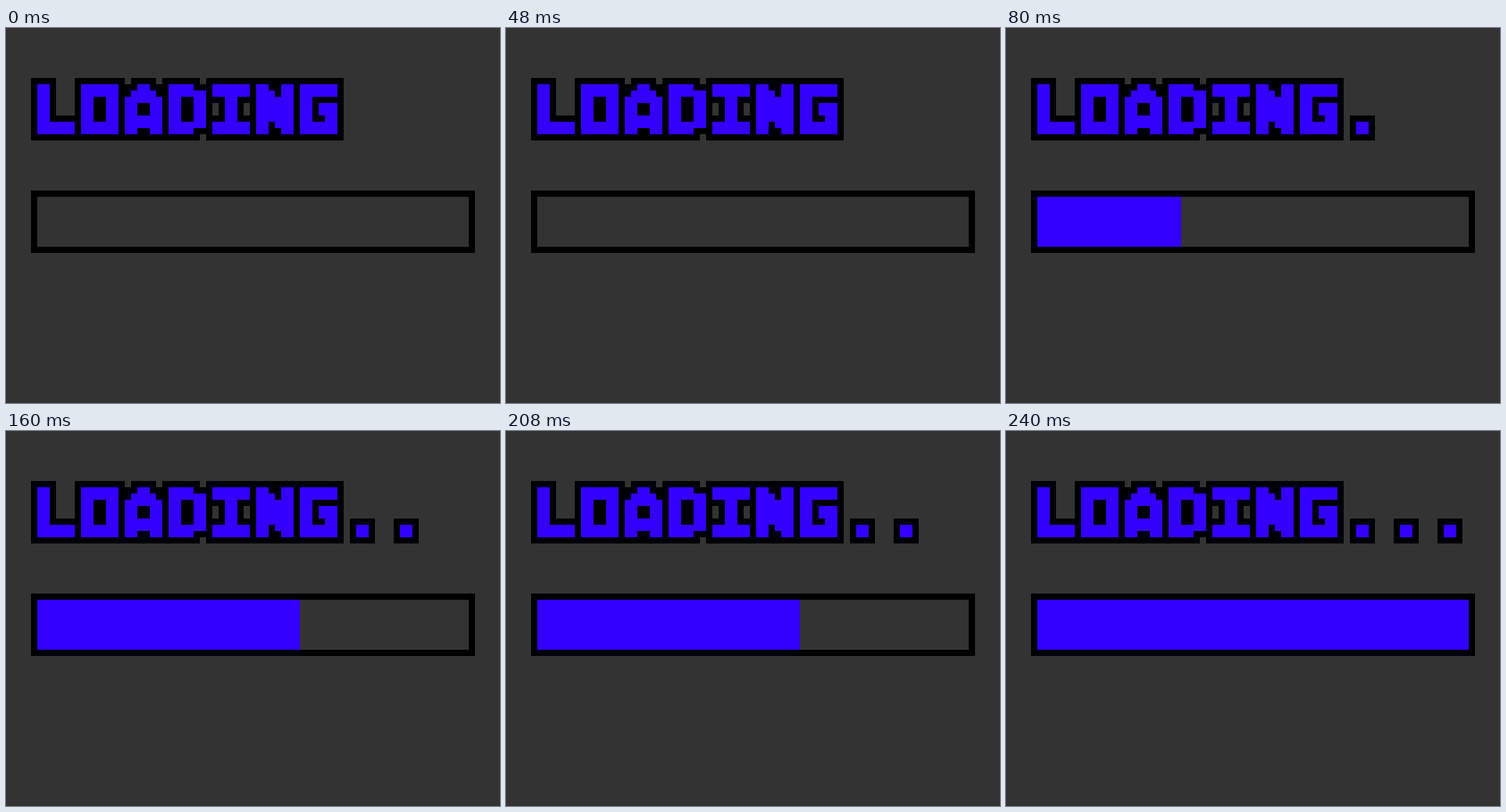
Animation of 790 by 600 pixels, one loop 320 ms. Source, as an HTML page with a canvas:

```html
<!DOCTYPE html>
<html lang="en">
<head>
<meta charset="utf-8">
<title>Loading</title>
<style>
  html, body { margin: 0; width: 100%; height: 100%; overflow: hidden; background: #333; }
  canvas { display: block; }
</style>
</head>
<body>
<canvas id="stage" width="790" height="600" role="img" aria-label="LOADING..."></canvas>
<script>
const ctx = document.getElementById('stage').getContext('2d');
const BLUE = '#3300ff';
const UNIT = 10;     // one pixel-art cell
const ADVANCE = 7;   // cells from one glyph to the next
const STEP = 80;     // ms
const FILLS = [0, 23, 42, 69];

// Glyph contours on a 6 x 8 cell grid
const GLYPHS = {
  L: 'M0 0h2v6h4v2h-6z',
  O: 'M0 0h6v8h-6z M2 2h2v4h-2z',
  A: 'M2 0h2v1h1v1h1v6h-2v-1h-2v1h-2v-6h1v-1h1z M2 3h2v2h-2z',
  D: 'M0 0h4v1h2v6h-2v1h-4z M2 2h2v4h-2z',
  I: 'M0 0h6v2h-2v4h2v2h-6v-2h2v-4h-2z',
  N: 'M0 0h2v1h1v1h1v-2h2v8h-2v-1h-1v-1h-1v2h-2z',
  G: 'M0 0h6v2h-4v4h2v-1h-1v-2h3v5h-6z',
  '.': 'M2 6h2v2h-2z'
};
for (const key in GLYPHS) GLYPHS[key] = new Path2D(GLYPHS[key]);

function eachGlyph(text, x, y, paint) {
  [...text].forEach((char, i) => {
    ctx.save();
    ctx.translate(x + i * ADVANCE, y);
    paint(GLYPHS[char]);
    ctx.restore();
  });
}

// All outlines go under all fills, since neighbours overlap
function drawText(text, x, y) {
  ctx.strokeStyle = '#000';
  ctx.lineWidth = 2;
  eachGlyph(text, x, y, path => ctx.stroke(path));
  ctx.fillStyle = BLUE;
  eachGlyph(text, x, y, path => ctx.fill(path, 'evenodd'));
}

function drawBar(fill) {
  ctx.fillStyle = BLUE;
  ctx.fillRect(5, 27, fill, 8);
  ctx.strokeStyle = '#000';
  ctx.lineWidth = 1;
  ctx.strokeRect(4.5, 26.5, 70, 9);
}

function draw(time) {
  const step = Math.floor(time / STEP) % FILLS.length;
  ctx.setTransform(UNIT, 0, 0, UNIT, 0, 0);
  ctx.fillStyle = '#333';
  ctx.fillRect(0, 0, 79, 60);
  drawText('LOADING' + '.'.repeat(step), 5, 9);
  drawBar(FILLS[step]);
}

const start = performance.now();
function tick() {
  draw(performance.now() - start);
  requestAnimationFrame(tick);
}
tick();
</script>
</body>
</html>
```
